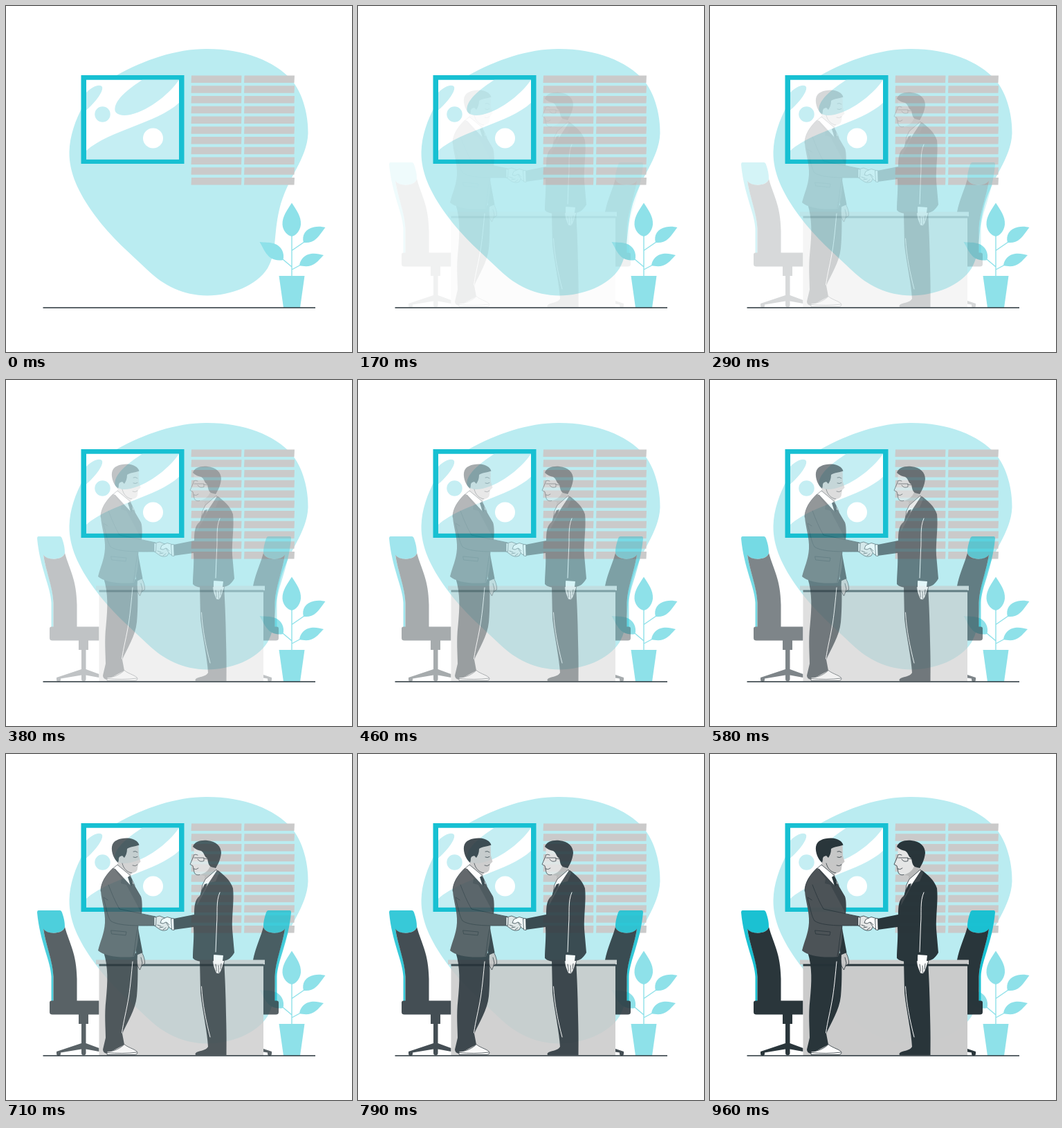
An HTML page for the animation above (1 s loop, 500 by 500 pixels).

```html
<!DOCTYPE html>
<html lang="en">
<head>
<meta charset="utf-8">
<title>Handshake</title>
<style>
  html, body { margin: 0; height: 100%; overflow: hidden; background: #fff; }
  svg { display: block; width: 100vw; height: 100vh; }
  .ink { fill: #263238; }
  .cyan { fill: #17c0d2; }
  .pale { fill: #c5eef3; }
  .gray { fill: #cacaca; }
  .suit { fill: #4a5054; }
  .lapel { fill: #3b4348; }
  .skin { fill: #c6c6c6; }
  .fair { fill: #e6e6e6; }
  .white { fill: #fff; }
  .edge { stroke: #263238; stroke-width: .8; stroke-linejoin: round; }
  .line { fill: none; stroke: #263238; stroke-width: .8; stroke-linecap: round; }
  .crease { fill: none; stroke: #fff; stroke-width: 1; stroke-linecap: round; }
</style>
</head>
<body>
<svg viewBox="0 0 500 500">
  <path fill="#baecf1" d="M290 62C345 62 388 80 412 106C430 127 437 160 436.500 184C435 222 406 248 395 294C386 333 392 355 378 379C362 404 325 418.500 291 418.500C255 418 228 404 205 382C180 358 152 335 128 302C104 269 91 240 91.500 211C92 188 100 165 112 143C122 122 142 109 160 100C200 78 245 62 290 62z"/>

  <g id="picture">
    <path class="cyan" d="M108.500 100h149v128h-149z"/>
    <path class="white" d="M116 106.800h134v114.700h-134z"/>
    <g class="pale">
      <path d="M116 125C125 116 136 112 139 117C141 125 126 142 116 150.500z"/>
      <circle cx="139.500" cy="156.500" r="11.200"/>
      <path d="M197 106.800H250C239 124 208 151 180 157C163 160 156 155 157.500 147C160 133 178 119 197 106.800z"/>
      <path d="M116 209C150 179 217 170 250 140V221.500H116z"/>
    </g>
    <circle class="white" cx="212.500" cy="191" r="14.500"/>
  </g>

  <path id="blinds" class="gray"/>

  <g id="plant" fill="#8ee1e9">
    <path d="M394.500 390h37L425 436h-24z"/>
    <path d="M413 284.500C419 294 427 304 426 316C425 325 419 332 413 333C407 332 400 325 399.500 316C399 304 407 294 413 284.500z"/>
    <path d="M430 342C427 331 433 322 445 319.500C452 318 457 319 461.500 320C456 327 452 334 445 339C440 342 435 342 430 342z"/>
    <path d="M400.500 367C403 357 398 347 388 343.500C381 341 373 342 366.500 341C371 348 374 357 381 363C388 368 395 368 400.500 367z"/>
    <path d="M424 375C425 366 432 359 441 358C448 357 453 359 459 360C453 366 449 372 441 375C435 377 429 376 424 375z"/>
    <path fill="none" stroke="#8ee1e9" stroke-width="1.400" d="M413 330V391M413.500 353L431 341M400 366L413 377M413 381L426 374"/>
  </g>

  <g id="room">
    <g id="chair">
      <path class="cyan" d="M47 226H78Q80 226 81 229C84 238 85 243 85 250C83 260 60 262 54 253C57 275 68.500 300 68.500 322V357H65.500V322C65 300 49 272 45 229Q45 226 47 226z"/>
      <path class="ink" d="M54 252.500C60 262 83 260 85 250C92 275 102 288 102.500 325V356.500H134.500V376.500H119V390H115.500V418L134.500 425V430L115.500 426.500V432A3 3 0 0 1 109 432V426.500L79 431.500V433A2.800 2.800 0 0 1 73 433V430L109 418V390H105V376.500H67Q63 376.500 63 373V359Q63 356.500 66 356.500H68.500V322C68 300 57 275 54 252.500z"/>
    </g>
    <use href="#chair" transform="matrix(-1 0 0 1 457 0)"/>
    <path class="gray" d="M130 297.500H374V304H372V436H134.500V304H130z"/>
    <path class="ink" d="M134.500 303.500H372V306.500H134.500z"/>
  </g>

  <g id="men">
    <!-- left man -->
    <path class="ink" d="M141 286C148 308 147 330 144.500 355C142 378 144 395 144 410L140 427Q140 432 146 433L171 420L168 404C175 388 187 370 189 350C191 330 190.500 305 190 288z"/>
    <path class="crease" d="M183 300C181 320 180 333 177.500 350C174 372 170 385 167.500 403"/>
    <path class="white edge" d="M146 430C156 430 166 425 171 419.500C177 425 189 427 190 431.500Q190 434.500 186 434.500H146z"/>
    <path class="line" d="M146 431.500C160 433 176 433 189 431"/>
    <path class="skin edge" d="M190 287L196 286C199 292 201 297 200.500 303L196 306L193.500 312L190 306C189 299 189 294 190 287z"/>
    <path class="line" d="M195 294L197 302L196 306"/>
    <path class="ink" d="M186 247H190L197.500 287L188 291z"/>
    <path class="skin" d="M163 150L160 165L180 180L181 172C187 172 190 169 190 165L191 159L194.500 155.500L192 147L191.500 131L172 133z"/>
    <path class="ink" d="M162 157C156 152 152 142 153 134C154 125 164 121.500 175 121.500C185 122 191 126 192.500 131.500C186 134 179 134 175 137C175 143 173 147 171 150L168 147L164 149z"/>
    <path class="skin" d="M169 148C165 146 162 150 163 154C165 158 168 158 170 156z"/>
    <path class="line" d="M184 141Q187 139.500 190 142M184 149Q187 150.500 190 148.500M183 161Q187 163 190 160M168 158C170 166 175 171 182 172"/>
    <path class="white edge" d="M154 166L161 160L179 175L186 190L183 202z"/>
    <path class="ink" d="M176 178L179 176L182 181L187 207L181 195L178 184z"/>
    <path class="suit" d="M154.500 165C144 175 137 186 137 198C138 213 144 228 143 244C142 260 136 271 133 284C142 292 163 295 185 293C190 280 192 262 191 248L215 248L216 235L196 231C197 218 197 211 195 206L184 188L181 193z"/>
    <path class="lapel" d="M154.500 165L158 166L181 191L184 187L195 206C196 215 197 222 196 231L190 219L174 189L166 187L167 180z"/>
    <path class="line" d="M154.500 165C144 175 137 186 137 198M148 189C153 202 158 214 164 224L216 235M141 208C145 224 147 235 151 241C162 249 192 248 215 248M141 207L147 211M152 255L174 257L173 262L153 260zM191 249C187 263 187 278 184 292"/>

    <!-- right man -->
    <path class="ink" d="M280 297H315C316 315 317 333 317.500 355C318 382 319 402 318.500 431V435H274Q272 432 278 430C285 428 290 427 292 423C291 402 284 372 281 345z"/>
    <path class="crease" d="M282.500 336C284 362 289 386 295 409"/>
    <path class="white edge" d="M300 289L314 289L315.500 300C313 306 312 313 308 317.500L304 317C301 310 298 304 299 297z"/>
    <path class="line" d="M303 304L304.500 314M307 306L307.500 316M311 303L310 311"/>
    <path class="fair" d="M272 135L271 150L266 159.500L270 161.500L271 165L272 171Q274 176 280 174.500L287 174L286 188L302 168V140z"/>
    <path class="line" d="M271.500 147L266 159.500L270 161.500L271 165L272 171Q274 176 280 174.500"/>
    <path fill="#b9b9b9" d="M280 174.500C289 172 293 168 296 160L303 167L286 188L287 176z"/>
    <path class="ink" d="M270 134C272 127 281 124 291 125C304 126 311 134 311 143C310 153 306 160 303 165L296 163C292 160 292 155 291 151C286 148 287 143 282 140C278 139 274 138 270 134z"/>
    <path class="line" d="M272 150H286V154.500Q280 157 277 152M286 151L293 152M271 146Q274 144 277 146M271 166Q275 168 278 165"/>
    <path class="white edge" d="M304 167L307 172L281 208L284 189L288 181z"/>
    <path class="ink" d="M287 188L291 187L289 193L279 209L283 196z"/>
    <path class="ink" d="M306 168C314 174 324 182 328 194C330 212 326 235 327 253L330 287C326 294 321 299 313 299L314 291L300 290V299C289 301 275 301 270 295C270 280 272 267 271 250L242 254V238L272 232C272 220 273 213 277 208L281 204z"/>
    <path class="lapel" d="M305 168L308 172L303 184L294 186L276 219L277 208L281 205z"/>
    <path class="crease" d="M309 200C303 213 306 230 304.500 246L303 286"/>

    <!-- joined hands -->
    <path class="fair edge" d="M214.500 236L222 234L232 238L237 247L233 254Q226 257 220 252L214.500 248z"/>
    <path class="white edge" d="M241.500 238L233 235.500L225 239L223 244L227 245L231 243L237 252L241.500 253z"/>
    <path class="line" d="M219 247L224 249M222 251L227 250M227 254L231 251M232 243L236 247"/>
    <path class="white edge" d="M238.500 238L242.500 237.500L243 254.500L239.500 254z"/>
    <path class="white edge" d="M214 235.500L217 236L216.500 248L214 248z"/>
  </g>

  <path stroke="#263238" stroke-width="1.700" d="M53.500 436H447"/>
</svg>
<script>
const $ = id => document.getElementById(id);

let slats = '';
for (let row = 0; row < 11; row++) {
  for (const x of [268, 344.5]) {
    slats += `M${x} ${100.5 + row * 14.75}h72.500l-.5 10.400h-72.500z`;
  }
}
$('blinds').setAttribute('d', slats);

const FPS = 24, HOLD = 130;
const ease = v => (1 - Math.cos(Math.PI * v)) / 2;

function draw(now) {
  const ms = now % 1000;
  const t = Math.floor((ms + 3.4) * FPS / 1000) / FPS;
  const opacity = ms < HOLD ? 0 : ease((t + .01) / 1.06);
  $('room').setAttribute('opacity', opacity);
  $('men').setAttribute('opacity', opacity);
  requestAnimationFrame(draw);
}
draw(0);
</script>
</body>
</html>
```
